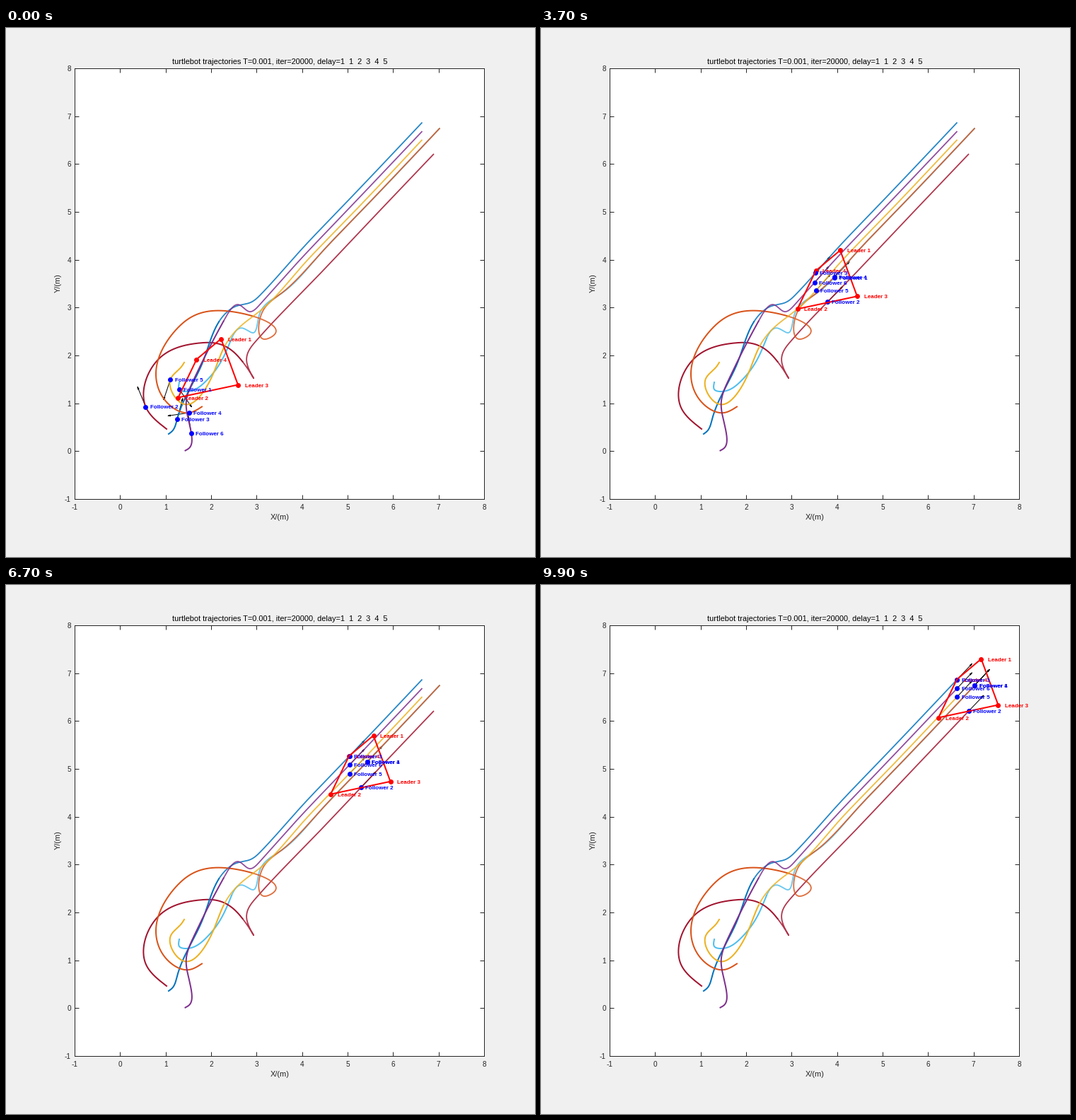
A matplotlib script that plays this animation: 748x748 px, repeating every 10 s.

```python
import numpy as np
import matplotlib.pyplot as plt
from matplotlib.animation import FuncAnimation

SIZE, DPI, FRAMES = 748, 100, 100
PX = 72 / DPI                                  # points per pixel
LEFT, RIGHT, TOP, BOTTOM = 97, 676, 57, 666
STEP = np.array([RIGHT - LEFT, TOP - BOTTOM]) / 9 * 0.05   # leader motion per frame
LAST = FRAMES - 1
ARROW = 30
SAMPLES = 40                                   # curve samples between key points

plt.rcParams["font.family"] = "Liberation Sans"
plt.rcParams["axes.unicode_minus"] = False

fig = plt.figure(figsize=(SIZE / DPI, SIZE / DPI), dpi=DPI, facecolor="#f0f0f0")

# Plot box with ticks
box = fig.add_axes([LEFT / SIZE, 1 - BOTTOM / SIZE,
                    (RIGHT - LEFT) / SIZE, (BOTTOM - TOP) / SIZE])
box.set(xlim=(-1, 8), ylim=(-1, 8), xticks=range(-1, 9), yticks=range(-1, 9))
box.tick_params(direction="in", top=True, right=True, length=6 * PX, width=PX,
                color="#262626", labelcolor="#262626", labelsize=10 * PX)
box.tick_params(axis="x", pad=7 * PX)
box.tick_params(axis="y", pad=5 * PX)
for spine in box.spines.values():
    spine.set(linewidth=PX, color="#262626")

# Transparent layer in pixel coordinates
stage = fig.add_axes([0, 0, 1, 1])
stage.set(xlim=(0, SIZE), ylim=(SIZE, 0))
stage.axis("off")


def caption(x, y, text, color="#262626", **kw):
    stage.text(x, y, text, size=11 * PX, ha="center", color=color, **kw)


caption(387.5, 51, "turtlebot trajectories T=0.001, iter=20000, delay=1  1  2  3  4  5", "black")
caption(387.5, 695, "X/(m)")
caption(74, 360.5, "Y/(m)", va="center", rotation=90)


def lengths(p):
    return np.r_[0, np.cumsum(np.hypot(*np.diff(p, axis=0).T))]


def spline(p):
    """Natural cubic spline through the points, parametrised by chord length."""
    d = lengths(p)
    h = np.diff(d)
    slope = np.diff(p, axis=0) / h[:, None]
    n = len(p)
    a, b = np.zeros((n, n)), np.zeros((n, 2))
    a[0, :2], b[0] = (2, 1), 3 * slope[0]
    a[-1, -2:], b[-1] = (1, 2), 3 * slope[-1]
    for i in range(1, n - 1):
        a[i, i - 1:i + 2] = h[i], 2 * (h[i - 1] + h[i]), h[i - 1]
        b[i] = 3 * (h[i] * slope[i - 1] + h[i - 1] * slope[i])
    m = np.linalg.solve(a, b)

    u = np.linspace(0, 1, SAMPLES, endpoint=False)[:, None]
    parts = [(2 * u**3 - 3 * u**2 + 1) * p[i] + (3 * u**2 - 2 * u**3) * p[i + 1]
             + h[i] * ((u**3 - 2 * u**2 + u) * m[i] + (u**3 - u**2) * m[i + 1])
             for i in range(n - 1)]
    return np.vstack(parts + [p[-1:]])


def label(text, color, zorder):
    return stage.text(0, 0, text, size=8 * PX, weight="bold", color=color, zorder=zorder)


class Follower:
    """Robot that swings in along a curve, then keeps pace with the leaders.

    Key points: `lead_in` ends at time 0, `chase` at MEET, `join` at SETTLE.
    """

    MEET, SETTLE, LOCK = 15, 29, 46

    def __init__(self, num, color, end, lead_in, chase, join):
        tail = [np.array(end) - (LAST - t) * STEP for t in (self.LOCK, 60, LAST)]
        self.curve = spline(np.array(lead_in + chase + join + tail, float))
        self.s = lengths(self.curve)
        stops = np.cumsum([len(lead_in), len(chase), len(join), 1]) - 1
        self.start, *self.marks = self.s[SAMPLES * stops]
        self.marks.append(self.s[-1])
        self.text = label(f"Follower {num}", "blue", 7)

        cut = np.searchsorted(self.s, self.travel(9))
        stage.plot(*self.curve[:cut + 1].T, color=color, lw=2 * PX, zorder=2)
        stage.plot(*self.curve[cut:].T, color=color, lw=1.8 * PX, alpha=0.85,
                   solid_capstyle="butt", zorder=2)

    def travel(self, t):
        """Arc length at time t: fast start that decays to cruising speed."""
        if t >= self.MEET:
            return np.interp(t, [self.MEET, self.SETTLE, self.LOCK, LAST], self.marks)
        u = t / self.MEET
        span = self.marks[0] - self.start
        speed = (self.marks[1] - self.marks[0]) / (self.SETTLE - self.MEET)
        cruise = speed * self.MEET / span
        fade = (1 - np.exp(-3 * u)) / (1 - np.exp(-3))
        return self.start + span * (cruise * u + (1 - cruise) * fade)

    def at(self, s):
        return np.array([np.interp(s, self.s, c) for c in self.curve.T])

    def pose(self, t):
        s = self.travel(t)
        d = self.at(s + 1.5) - self.at(s - 1.5)
        return self.at(s), d / np.hypot(*d)


followers = [
    Follower(1, "#4DBEEE", (613.5, 141.5),
             [(245, 501), (245, 511)],
             [(255, 514), (283, 499), (314, 451), (335, 424.5), (349, 431)],
             [(358, 406), (387, 377)]),
    Follower(2, "#A2142F", (605, 178),
             [(227, 567), (197.5, 535.5)],
             [(218, 466), (273, 445.5), (327, 463), (350, 495), (340.5, 473)],
             [(354, 442), (379, 414.5)]),
    Follower(3, "#0072BD", (588.5, 133.5),
             [(230, 574), (235, 570), (242, 553)],
             [(278, 473), (312, 402), (325, 393.5)],
             [(346, 388), (361, 376)]),
    Follower(4, "#D95319", (613.5, 141.5),
             [(277, 535.5), (259, 544)],
             [(228, 530), (212, 488), (241, 426), (310, 400), (378, 435), (365, 440)],
             [(361, 405), (387, 377)]),
    Follower(5, "#EDB120", (588.5, 158),
             [(252, 473), (248, 479), (232.5, 497)],
             [(252, 532), (285, 505), (312, 445), (327, 426)],
             [(360.5, 399)]),
    Follower(6, "#7E2F8E", (588.5, 146),
             [(253.5, 597.5), (259, 594), (262, 573)],
             [(255, 527), (266, 496), (309, 412), (330, 391.5)],
             [(344, 401), (359, 391)]),
]

# Corners in the order leader 1, 2, 3, 4
corners = np.array([(304, 439.5), (243.5, 522.5), (328, 504.5), (269.5, 468.5)])
ring = [0, 3, 1, 2, 0]
leader_text = [label(f"Leader {i + 1}", "red", 6) for i in range(4)]

arrows, = stage.plot([], [], color="black", lw=PX, zorder=1.5)
dots = dict(ls="", marker="o", ms=7 * PX, mew=0, snap=False)
red_dots, = stage.plot([], [], color="red", zorder=3, **dots)
blue_dots, = stage.plot([], [], color="blue", zorder=4, **dots)
frame_line, = stage.plot([], [], color="red", lw=2 * PX, zorder=5)


def arrow(p, d):
    tip = p + ARROW * d
    back = tip - 3 * d
    side = 0.8 * np.array([-d[1], d[0]])
    gap = (np.nan, np.nan)
    return [p, tip, gap, back + side, tip, back - side, gap]


def update(t):
    lead = corners + t * STEP
    red_dots.set_data(*lead.T)
    frame_line.set_data(*lead[ring].T)
    for text, (x, y) in zip(leader_text, lead):
        text.set_position((x + 9.6, y + 3))

    poses = [f.pose(t) for f in followers]
    blue_dots.set_data(*np.array([p for p, _ in poses]).T)
    arrows.set_data(*np.array([q for p, d in poses for q in arrow(p, d)]).T)
    for f, ((x, y), _) in zip(followers, poses):
        f.text.set_position((x + 6.4, y + 3))
    return [red_dots, blue_dots, frame_line, arrows]


anim = FuncAnimation(fig, update, frames=FRAMES, interval=100, repeat=True, repeat_delay=0)
plt.show()
```
